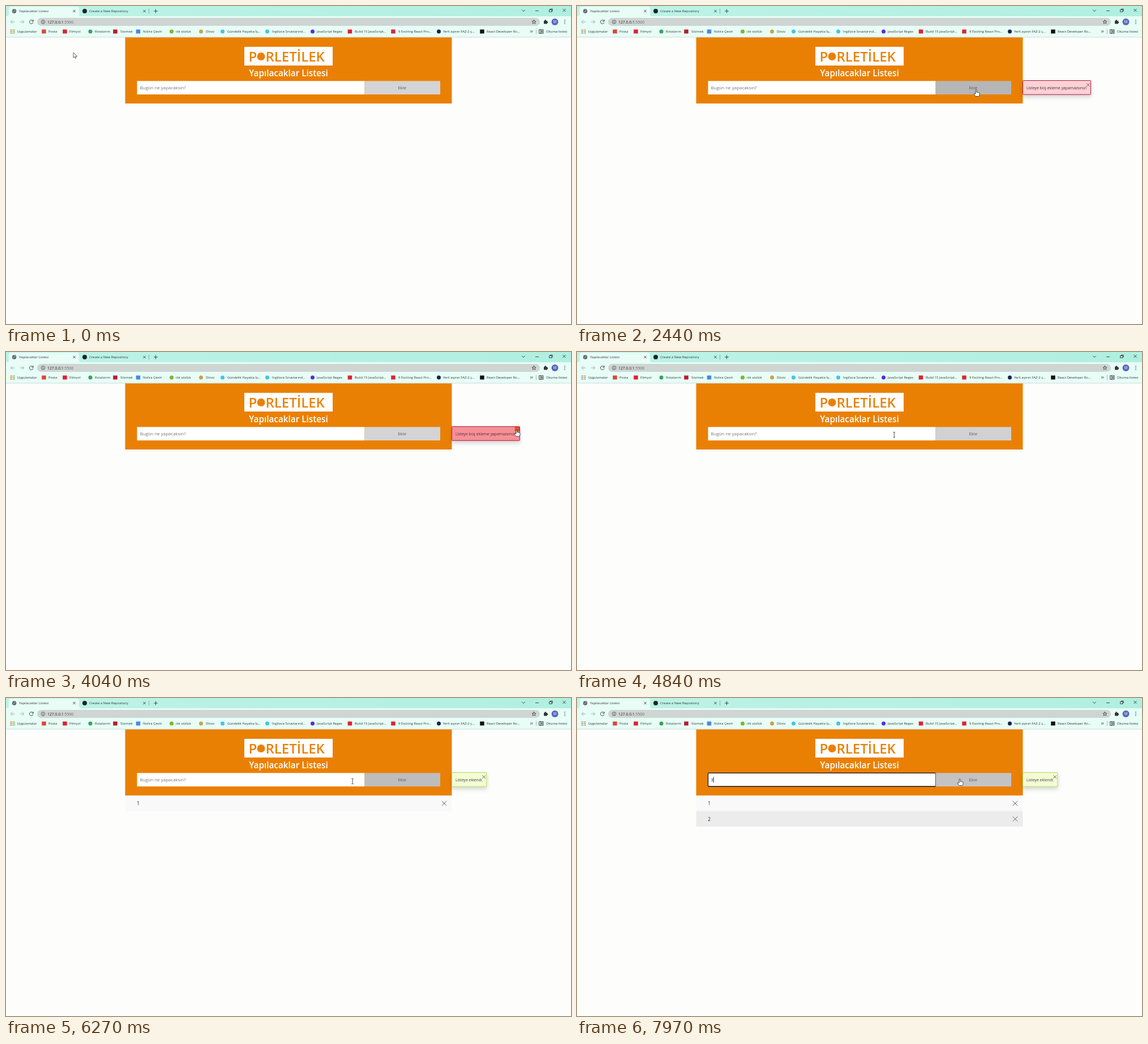
Write an HTML page that moves like this. It is 998 by 561 pixels and loops after 8000 ms.

```html
<!DOCTYPE html>
<html lang="tr">
<head>
<meta charset="utf-8">
<title>Yapılacaklar Listesi</title>
<style>
html, body { margin: 0; width: 100%; height: 100%; overflow: hidden; background: #fdfdfc; }
svg { display: block; width: 998px; height: 561px; font-family: "Open Sans", "Noto Sans", sans-serif; }
.line { fill: none; stroke-width: .9; stroke-linecap: round; stroke-linejoin: round; }
</style>
</head>
<body>
<svg id="stage" viewBox="0 0 998 561">
  <defs>
    <linearGradient id="strip"><stop stop-color="#bdf3e6"/><stop offset="1" stop-color="#b0efe0"/></linearGradient>
    <filter id="shadow" x="-20%" y="-50%" width="140%" height="250%">
      <feDropShadow dx="0" dy="4" stdDeviation="3.5" flood-opacity=".16"/>
    </filter>
  </defs>
  <g id="chrome"></g>
  <g id="page"></g>
  <g id="items"></g>
  <g id="toasts"></g>
  <g id="cursors" stroke-linejoin="round">
    <path id="arrow" d="M0 0V9.3L2.2 7.3L3.6 10.4L5 9.8L3.6 6.8H6.6Z" fill="#fff" stroke="#222" stroke-width=".7"/>
    <path id="hand" d="M-1 .8Q0-.5 1 .8V4.8Q2 4 2.9 5Q4 4.4 4.5 5.5Q6 5.2 6 6.7V9Q5.6 11 4.6 12H-.8Q-2.8 9.8-4 7.5Q-3.2 6-1 7.5Z" fill="#fff" stroke="#222" stroke-width=".8"/>
    <path id="beam" d="M-1.8-4.5H-.4L0-4L.4-4.5H1.8M0-4V4M-1.8 4.5H-.4L0 4L.4 4.5H1.8" fill="none" stroke="#222" stroke-width=".8"/>
  </g>
</svg>
<script>
const $ = id => document.getElementById(id);
const LOOP = 8000;

// Markup helpers
const rect = (x, y, w, h, fill, extra = '') =>
  `<rect x="${x}" y="${y}" width="${w}" height="${h}" fill="${fill}" ${extra}/>`;
const disc = (x, y, r, fill, extra = '') =>
  `<circle cx="${x}" cy="${y}" r="${r}" fill="${fill}" ${extra}/>`;
const label = (x, y, size, text, fill = '#333', extra = '') =>
  `<text x="${x}" y="${y}" font-size="${size}" fill="${fill}" ${extra}>${text}</text>`;
const line = (d, color = '#333', extra = '') =>
  `<path class="line" d="${d}" stroke="${color}" ${extra}/>`;
const cross = (x, y, r, color) =>
  line(`M${x - r} ${y - r}L${x + r} ${y + r}M${x + r} ${y - r}L${x - r} ${y + r}`, color);
const show = (id, visible) => $(id).style.display = visible ? '' : 'none';

// icon x, icon colour, round icon, text x, text
const bookmarks = [
  [67, '#dc4638', 0, 75, 'Posta'],
  [104, '#e3202b', 0, 112, 'Filmyol'],
  [149, '#35a45a', 1, 157, 'Rotalarım'],
  [193, '#b71c2c', 0, 202, 'Sözmek'],
  [233.5, '#4a86e8', 0, 242, 'Nolira Çeviri'],
  [292.5, '#7fb52e', 1, 300, 'ılık sözlük'],
  [344.5, '#c9a24a', 1, 353, 'Döviz'],
  [382.5, '#45c3e6', 1, 391, 'Gündelik Hayatta İş...'],
  [461.5, '#45c3e6', 1, 470, 'İngilizce Sınavlarınd...'],
  [541.5, '#5a2bd8', 1, 549, 'JavaScript Regex'],
  [607.5, '#e3202b', 0, 616, 'Build 15 JavaScript...'],
  [684, '#d92732', 0, 693, '9 Exciting React Pro...'],
  [764.5, '#1d2050', 1, 772, 'Yerli aşının FAZ-2 ç...'],
  [841, '#111', 0, 849, 'React Developer Ro...']
];

function drawBrowser() {
  let s = rect(0, 0, 998, 18, 'url(#strip)') + rect(0, 18, 998, 37, '#e7fdf6')
    + '<path d="M1 18Q5 18 5 14V5Q5 1 9 1H125Q129 1 129 5V14Q129 18 133 18Z" fill="#e7fdf6"/>'
    + rect(0, 54.6, 998, .8, '#c3d2cd');
  // Tabs
  s += disc(14.5, 9, 3.7, '#4f5557') + line('M11.8 8Q13.5 9 14 11M14 6.5L16.5 8L15.5 10', '#dfeeea')
    + label(23, 11.2, 6, 'Yapılacaklar Listesi') + cross(120.5, 9, 1.9, '#333')
    + disc(139, 9, 4, '#1e2327') + label(147, 11.2, 6, 'Create a New Repository')
    + cross(244.5, 9, 1.9, '#333') + line('M252.5 5V13', '#7fa99e') + line('M261.5 9H267.5M264.5 6V12');
  // Window controls
  s += line('M911.5 7L914 9.5L916.5 7M935.5 8.5H940.5') + cross(986, 7.5, 2.3, '#333')
    + line('M960 6.5H964V10.3H960ZM961.3 6.3V5.2H965.2V9H964.2');
  // Toolbar
  s += line('M15 28H8.5M11.3 25L8.3 28L11.3 31M25 28H31.5M28.7 25L31.7 28L28.7 31', '#99a8a4')
    + line('M47.6 26A3.4 3.4 0 1 0 48 29.3M48.2 24.5V27H45.7', '#333', 'stroke-width="1.1"')
    + rect(55, 21, 888, 14, '#ced5d3', 'rx="7"')
    + disc(65.5, 28, 3.3, 'none', 'stroke="#444" stroke-width=".8"') + line('M65.5 27.6V29.7M65.5 26.1V26.2', '#444')
    + label(73, 30.5, 6.8, '127.0.0.1<tspan fill="#666">:5500</tspan>', '#222')
    + line('M932.5 24.5L933.5 27H936L934 28.7L934.8 31.2L932.5 29.7L930.2 31.2L931 28.7L929 27H931.5Z', '#444', 'stroke-width=".7"')
    + rect(950, 26, 6, 5.6, '#333', 'rx=".8"') + disc(952.7, 25.5, 1.3, '#333') + disc(956, 28.7, 1.3, '#333')
    + disc(969.5, 28, 6, '#5867b9') + label(969.5, 30.2, 6.2, 'M', '#fff', 'text-anchor="middle"')
    + [25, 28, 31].map(y => disc(987, y, .8, '#333')).join('');
  // Bookmarks
  const dots = ['#d94a3c', '#e8ac22', '#35a45a'];
  for (let i = 0; i < 9; i++)
    s += rect(8 + i % 3 * 2.7, 41.5 + Math.floor(i / 3) * 2.7, 1.7, 1.7, dots[i % 3]);
  s += label(19.5, 47.2, 5.95, 'Uygulamalar');
  for (const [x, color, round, textX, text] of bookmarks)
    s += (round ? disc(x, 45, 3.5, color) : rect(x - 3.8, 41.5, 7.5, 7, color)) + label(textX, 47.2, 5.95, text);
  s += line('M926.5 43.5L928 45L926.5 46.5M928.9 43.5L930.4 45L928.9 46.5') + line('M936.5 41V49', '#9bb5ae')
    + line('M942 41.7H949V48.3H942ZM944 41.7V48.3M945.5 43.7H947.5M945.5 45H947.5M945.5 46.3H947.5', '#333', 'stroke-width=".8"')
    + label(954, 47.2, 5.95, 'Okuma listesi');
  $('chrome').innerHTML = s;
}

function drawPage() {
  const orange = '#ea8003', bold = 'font-weight="600"', middle = 'text-anchor="middle"';
  $('page').innerHTML = rect(210.5, 55.4, 577, 116.6, orange)
    + rect(421, 72, 156, 33, '#fff')
    + label(428.5, 97.5, 24, 'P', orange, bold) + disc(450.5, 89, 7, orange)
    + label(458.5, 97.5, 24, 'RLETİLEK', orange, bold)
    + label(499, 124.4, 15.3, 'Yapılacaklar Listesi', '#fff', `${bold} ${middle}`)
    + rect(231.5, 132.3, 402, 23.7, '#fff', 'id="field"')
    + label(236.5, 147.3, 7.9, '', '#757575', 'id="entry"')
    + line('M241.2 139.5V149', '#222', 'id="caret"')
    + rect(633.5, 132.3, 133.5, 23.7, '#d3d3d3', 'id="button"')
    + label(699.7, 147.3, 7.9, 'Ekle', '#5c5f70', middle);

  $('items').innerHTML = [1, 2].map(n => {
    const y = 172 + (n - 1) * 27.5;
    return `<g id="item${n}">` + rect(210.5, y, 577, 27.5, n % 2 ? '#f9f9fa' : '#ececec')
      + label(231.3, y + 17, 8.3, n, '#222') + cross(774, y + 14, 4, '#555') + '</g>';
  }).join('');

  const toast = (id, width, fill, border, text, color) => `<g id="${id}">`
    + rect(787.5, 131.5, width, 24.7, fill, `id="${id}Box" stroke="${border}" rx=".8" filter="url(#shadow)"`)
    + rect(787 + width - 8.2, 132, 8.2, 8, '#ee4d1c', `id="${id}Close"`)
    + label(794, 146.6, 6.8, text, color) + cross(787.5 + width - 4.6, 139.2, 2.5, '#555') + '</g>';
  $('toasts').innerHTML = toast('error', 120, '#f9d2d5', '#b01a3c', 'Listeye boş ekleme yapamazsınız!', '#5d2a33')
    + toast('success', 61.3, '#f3fbd8', '#b4de4c', 'Listeye eklendi.', '#3f4a2c');
}

// Pointer stops: time, x, y
const path = [
  [0, 119, 82], [150, 119, 82], [420, 330, 203], [830, 690, 150], [1000, 705, 147.5],
  [3000, 705, 147.5], [3600, 902, 137], [4300, 902, 137], [4850, 560, 146], [5620, 560, 146],
  [5800, 697, 146.5], [6080, 697, 146.5], [6350, 590, 147], [6560, 590, 147], [6860, 677, 143.5],
  [7180, 677, 143.5], [7400, 600, 146], [7800, 600, 146], [7960, 676, 142.5], [LOOP, 676, 142.5]
];
// Form states: start, focused, text, item count
const states = [
  [0, 0, '', 0], [4880, 1, '', 0], [5400, 1, '1', 0], [6000, 0, '', 1], [6380, 1, '', 1],
  [6540, 1, '2', 1], [7160, 0, '', 2], [7430, 1, '', 2], [7640, 1, '3', 2]
];
const areas = {
  field: [231, 132, 633, 156], button: [633, 132, 767, 156],
  error: [787, 131, 908, 157], close: [899, 131, 908, 141]
};

const clamp = v => Math.max(0, Math.min(1, v));
const mix = (a, b, k) => `rgb(${a.map((v, i) => Math.round(v + (b[i] - v) * k))})`;

function pointer(t) {
  const i = Math.max(1, path.findIndex(p => p[0] >= t));
  const [t0, x0, y0] = path[i - 1], [t1, x1, y1] = path[i];
  const k = clamp((t - t0) / (t1 - t0)), e = k * k * (3 - 2 * k);
  return [x0 + (x1 - x0) * e, y0 + (y1 - y0) * e];
}
const inside = ([x, y], name) => {
  const [l, t, r, b] = areas[name];
  return x >= l && x < r && y >= t && y < b;
};
// Share of the last 180 ms spent over an area, which gives a linear hover fade
function hover(t, name) {
  let n = 0;
  for (let d = 0; d < 180; d += 10) n += inside(pointer(Math.max(0, t - d)), name);
  return n / 18;
}

function render(t) {
  const [, focused, text, count] = states.filter(s => s[0] <= t).pop();
  $('entry').textContent = text || 'Bugün ne yapacaksın?';
  $('entry').setAttribute('fill', text ? '#222' : '#757575');
  const field = $('field');
  field.setAttribute('stroke', focused ? '#151515' : 'none');
  field.setAttribute('stroke-width', 1.3);
  field.setAttribute('rx', focused ? 1.2 : 0);
  show('caret', focused);
  $('caret').setAttribute('transform', `translate(${text ? 0 : -4.7} 0)`);
  show('item1', count > 0);
  show('item2', count > 1);

  const at = pointer(t);
  $('button').setAttribute('fill', mix([212, 212, 212], [182, 182, 183], hover(t, 'button')));
  $('error').setAttribute('opacity', clamp((t - 1500) / 150) * clamp((4330 - t) / 150));
  $('errorBox').setAttribute('fill', mix([249, 210, 213], [245, 144, 151], hover(t, 'error')));
  $('errorClose').setAttribute('opacity', hover(t, 'close'));
  $('success').setAttribute('opacity', clamp((t - 6000) / 150));
  $('successClose').setAttribute('opacity', 0);

  const clickable = inside(at, 'button') || (inside(at, 'close') && t < 4330);
  const shape = clickable ? 'hand' : inside(at, 'field') ? 'beam' : 'arrow';
  for (const id of ['arrow', 'hand', 'beam']) show(id, id === shape);
  $('cursors').setAttribute('transform', `translate(${at})`);
}

drawBrowser();
drawPage();
const start = performance.now();
function tick() {
  render((performance.now() - start) % LOOP);
  requestAnimationFrame(tick);
}
tick();
</script>
</body>
</html>
```
